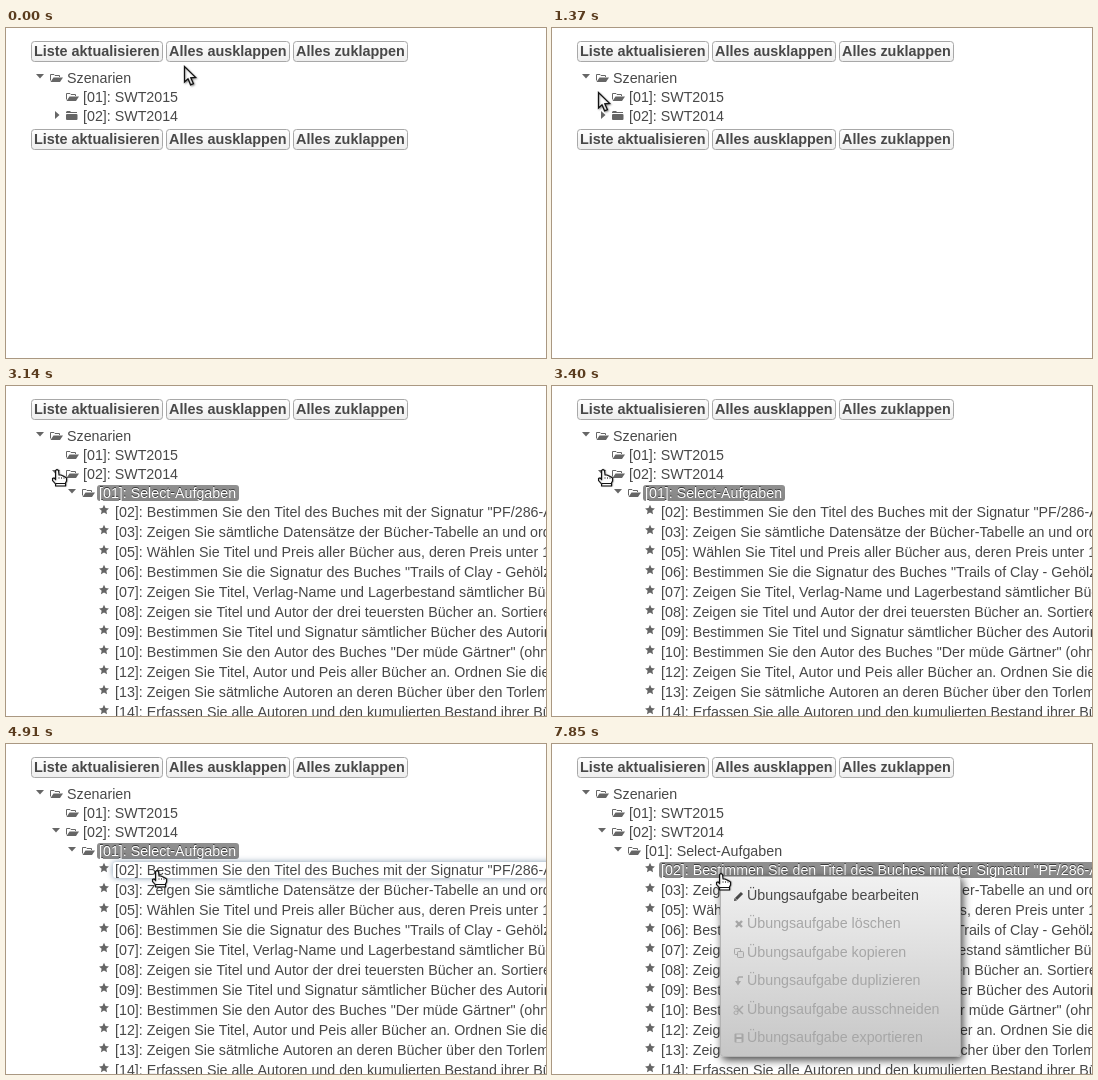
An HTML page with a canvas for the animation above (8000 ms loop, 540 by 330 pixels).

```html
<!DOCTYPE html>
<html lang="de">
<head>
<meta charset="utf-8">
<title>Szenarien</title>
<style>
html, body { margin: 0; width: 100%; height: 100%; overflow: hidden; background: #fff; }
canvas { display: block; }
</style>
</head>
<body>
<canvas id="stage" width="540" height="330"></canvas>
<script>
const ctx = document.getElementById('stage').getContext('2d');
const LOOP = 8000, OPEN = 3140, CLICK = 5810, MENU = 7850;
const SANS = '"Liberation Sans", Arial, sans-serif';
const REGULAR = '14.25px ' + SANS, BOLD = 'bold 14.4px ' + SANS;
const INK = '#484848', ICON = '#666';

const BUTTONS = [
  ['Liste aktualisieren', 25, 132],
  ['Alles ausklappen', 160, 124],
  ['Alles zuklappen', 287, 115]
];
const TASKS = [
  '[02]: Bestimmen Sie den Titel des Buches mit der Signatur "PF/286-A',
  '[03]: Zeigen Sie sämtliche Datensätze der Bücher-Tabelle an und ordnen',
  '[05]: Wählen Sie Titel und Preis aller Bücher aus, deren Preis unter 10',
  '[06]: Bestimmen Sie die Signatur des Buches "Trails of Clay - Gehölz',
  '[07]: Zeigen Sie Titel, Verlag-Name und Lagerbestand sämtlicher Bücher',
  '[08]: Zeigen sie Titel und Autor der drei teuersten Bücher an. Sortieren',
  '[09]: Bestimmen Sie Titel und Signatur sämtlicher Bücher des Autorin',
  '[10]: Bestimmen Sie den Autor des Buches "Der müde Gärtner" (ohne A',
  '[12]: Zeigen Sie Titel, Autor und Peis aller Bücher an. Ordnen Sie die',
  '[13]: Zeigen Sie sätmliche Autoren an deren Bücher über den Torlem',
  '[14]: Erfassen Sie alle Autoren und den kumulierten Bestand ihrer Bücher'
];
const ACTIONS = ['bearbeiten', 'löschen', 'kopieren', 'duplizieren', 'ausschneiden', 'exportieren'];

// Pointer stops: time, x, y
const STOPS = [
  [0, 178, 38], [40, 177, 37], [150, 171, 30], [300, 135, 25], [430, 96, 35],
  [550, 60, 57], [680, 40, 58], [810, 29, 50], [950, 28, 44], [1100, 32, 43],
  [1300, 42, 58], [1500, 53, 74], [1690, 54, 79], [1900, 55, 83], [2050, 49, 82],
  [2190, 51, 84], [4000, 51, 84], [4200, 70, 97], [4390, 97, 104],
  [4600, 122, 116], [4830, 144, 125.5], [5000, 158, 128], [5160, 169, 130]
];

function pointerAt(t) {
  const i = STOPS.findIndex(s => s[0] > t);
  if (i < 0) return STOPS[STOPS.length - 1].slice(1);
  const [t0, x0, y0] = STOPS[i - 1], [t1, x1, y1] = STOPS[i];
  const k = (t - t0) / (t1 - t0);
  return [Math.round(x0 + (x1 - x0) * k), Math.round(y0 + (y1 - y0) * k)];
}

const inside = (px, py, x, y, w, h) => px >= x && px < x + w && py >= y && py < y + h;

function text(str, x, y, color = INK, font = REGULAR) {
  ctx.font = font;
  ctx.fillStyle = color;
  ctx.fillText(str, x, y);
}

function poly(points, fill, stroke, width = 1) {
  ctx.beginPath();
  for (let i = 0; i < points.length; i += 2) ctx.lineTo(points[i], points[i + 1]);
  ctx.closePath();
  if (fill) { ctx.fillStyle = fill; ctx.fill(); }
  if (stroke) { ctx.strokeStyle = stroke; ctx.lineWidth = width; ctx.stroke(); }
}

function round(x, y, w, h, r, fill, stroke) {
  ctx.beginPath();
  ctx.roundRect(x, y, w, h, r);
  if (fill) { ctx.fillStyle = fill; ctx.fill(); }
  if (stroke) { ctx.strokeStyle = stroke; ctx.lineWidth = 1; ctx.stroke(); }
}

function vertical(y0, y1, from, to) {
  const g = ctx.createLinearGradient(0, y0, 0, y1);
  g.addColorStop(0, from);
  g.addColorStop(1, to);
  return g;
}

function withShadow(color, blur, dx, dy, draw) {
  ctx.save();
  ctx.shadowColor = color;
  ctx.shadowBlur = blur;
  ctx.shadowOffsetX = dx;
  ctx.shadowOffsetY = dy;
  draw();
  ctx.restore();
}

function moved(x, y, draw) {
  ctx.save();
  ctx.translate(x, y);
  draw();
  ctx.restore();
}

const glow = (x, y, w, h) =>
  withShadow('rgba(60,95,130,.65)', 6, 0, 0, () => round(x, y, w, h, 3, '#fff'));

function buttons(y, px, py) {
  for (const [label, x, w] of BUTTONS) {
    if (inside(px, py, x, y, w, 21)) glow(x, y, w, 21);
    round(x + .5, y + .5, w - 1, 20, 3, vertical(y, y + 21, '#ffffff', '#ededed'), '#a8a8a8');
    text(label, x + 3, y + 15, INK, BOLD);
  }
}

const arrowDown = (x, y) => poly([x, y, x + 8, y, x + 4, y + 4.5], ICON);
const arrowRight = (x, y) => poly([x, y, x + 4.5, y + 4, x, y + 8], ICON);

function folder(x, y, open) {
  if (open) {
    line([x + .5, y + 7.5, x + .5, y + 1.5, x + 4, y + 1.5, x + 5, y + 2.5,
      x + 9.5, y + 2.5, x + 9.5, y + 4], ICON, 1);
    poly([x + 3.5, y + 4.5, x + 13, y + 4.5, x + 10, y + 9, x + .5, y + 9], ICON);
  } else {
    poly([x, y + 2, x, y + 1, x + 1, y, x + 4, y, x + 5, y + 1, x + 11, y + 1, x + 11, y + 2], ICON);
    round(x, y + 3, 11.5, 6, 1, ICON);
  }
}

function star(cx, cy) {
  const p = [];
  for (let i = 0; i < 10; i++) {
    const a = i * Math.PI / 5 - Math.PI / 2, r = i % 2 ? 2.5 : 5.2;
    p.push(cx + r * Math.cos(a), cy + r * Math.sin(a));
  }
  poly(p, ICON);
}

function label(str, x, y, w, selected, hover) {
  const top = y - 13;
  if (hover) glow(x - 2, top, w, 16);
  if (!selected) return text(str, x, y);
  round(x - 2, top, w, 16, 3, vertical(top, top + 16, '#909090', '#868686'));
  withShadow('rgba(0,0,0,.6)', 0, 0, -1, () => text(str, x, y, '#fff'));
}

function tooltip() {
  poly([230, 107, 236, 101, 236, 113], '#222');
  round(235, 94, 173, 27, 3, '#0455aa');
  text('Unbewertetes Uebungsblatt', 243, 111, '#fff', 'bold 11.2px "Open Sans", sans-serif');
}

function note() {
  round(189, 142, 126, 34, 2, '#808080');
  round(191, 144, 122, 30, 1, '#fff');
  round(193, 146, 118, 26, 0, '#8b8b8b');
  text('Rechtsklick', 201, 165, '#f00', 'bold 18.7px ' + SANS);
}

function line(points, color, width = 1.5) {
  ctx.beginPath();
  for (let i = 0; i < points.length; i += 2) ctx.lineTo(points[i], points[i + 1]);
  ctx.strokeStyle = color;
  ctx.lineWidth = width;
  ctx.stroke();
}

// Menu icons around their own centre
const GLYPHS = [
  c => { line([-3, 3, 3, -3], c, 3); poly([-5, 5, -4.5, 2, -2, 4.5], c); },
  c => { line([-3, -3, 3, 3], c, 2.4); line([3, -3, -3, 3], c, 2.4); },
  c => { round(-4.5, -4.5, 6, 6, 1, null, c); round(-1.5, -1.5, 6, 6, 1, '#d8d8d8', c); },
  c => { line([4, -4, 0, -4, -1, -3, -1, 2], c); poly([-4, 0, 2, 0, -1, 4.5], c); },
  c => {
    line([-2, -2, 4, 4], c); line([-2, 2, 4, -4], c);
    round(-5, -4.5, 4, 3.5, 2, null, c); round(-5, 1, 4, 3.5, 2, null, c);
  },
  c => { round(-4.5, -4.5, 9, 9, 1, c); round(-2.5, -3.5, 5, 2.5, 0, '#d0d0d0'); round(-2.5, 1, 5, 3, 0, '#d0d0d0'); }
];

function menu() {
  withShadow('rgba(0,0,0,.75)', 8, 2, 3, () => round(168, 132, 241, 181, 3, '#ddd'));
  round(168.5, 132.5, 240, 180, 3, vertical(132, 313, '#f1f1f1', '#c6c6c6'), '#b4b4b4');
  ACTIONS.forEach((action, i) => {
    const y = 151 + 28.4 * i, color = i ? '#a6a6a6' : INK;
    moved(187, Math.round(y) + 1, () => GLYPHS[i](color));
    text('Übungsaufgabe ' + action, 195, Math.round(y + 5), color);
  });
}

function arrowPointer() {
  withShadow('rgba(0,0,0,.35)', 2, 1, 1, () =>
    poly([.5, .5, .5, 16, 4, 12.8, 6.6, 18.8, 9.4, 17.6, 6.8, 11.8, 11.6, 11.4], '#fff', '#111', 1.3));
}

function handPointer() {
  withShadow('rgba(0,0,0,.25)', 1, 1, 0, () =>
    poly([-1.5, .5, 0, -.5, 1.5, .5, 2, 5, 4, 5, 6, 6, 8, 7, 9.5, 8, 9.5, 11,
      8.5, 13, 8.5, 16, -1.5, 16, -1.5, 14, -4.5, 10.5, -4.5, 8.5, -3, 8, -1.5, 9.5], '#fff', '#111', 1.1));
  for (const x of [2, 4.5, 7]) line([x, 7, x, 9], '#555', .8);
  line([-1.5, 13.5, 8.5, 13.5], '#111', 1);
}

function isHand(t, x, y) {
  return t >= 1900 || inside(x, y, 26, 41, 16, 16) || inside(x, y, 42, 79, 16, 18);
}

function draw(t) {
  const [px, py] = pointerAt(t), open = t >= OPEN;
  ctx.fillStyle = '#fff';
  ctx.fillRect(0, 0, 540, 330);

  buttons(13, px, py);
  arrowDown(30, 46);
  folder(44, 45, true);
  text('Szenarien', 61, 55);
  folder(60, 64, true);
  text('[01]: SWT2015', 77, 74);
  folder(60, 83, open);
  text('[02]: SWT2014', 77, 93);

  if (open) {
    const clicked = t >= CLICK;
    const onSheet = inside(px, py, 91, 98, 142, 18);
    const onTask = !clicked && inside(px, py, 106, 116, 434, 20);
    arrowDown(46, 84);
    arrowDown(62, 103);
    folder(76, 102, true);
    label('[01]: Select-Aufgaben', 93, 112, 142, !clicked, onSheet);
    TASKS.forEach((task, i) => {
      const y = 131 + 20 * i;
      star(98, y - 7);
      label(task, 109, y, 450, !i && clicked, !i && onTask);
    });
    if (onSheet) tooltip();
    if (t >= MENU) menu();
    else if (clicked) note();
  } else {
    arrowRight(49, 83);
    buttons(101, px, py);
  }

  moved(px, py, isHand(t, px, py) ? handPointer : arrowPointer);
}

const start = performance.now();
function tick() {
  draw((performance.now() - start) % LOOP);
  requestAnimationFrame(tick);
}
tick();
</script>
</body>
</html>
```
